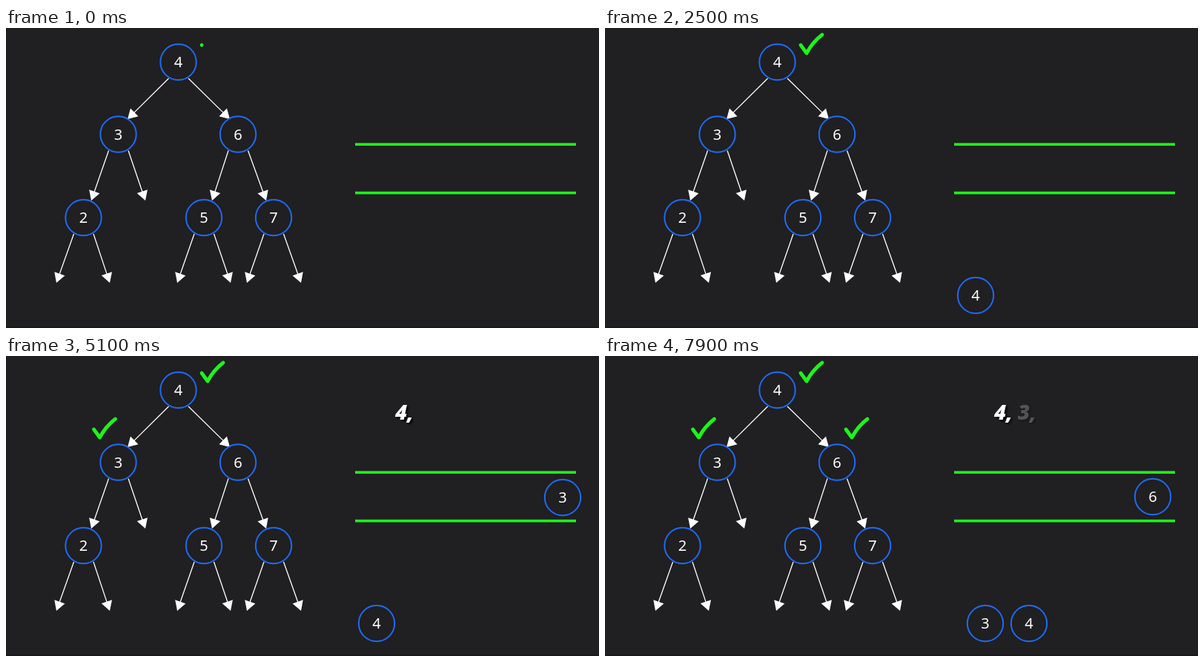
These frames come from a looping animation (800x405 px, 8000 ms). An HTML page with a canvas:

```html
<!DOCTYPE html>
<html>
<head>
<meta charset="utf-8">
<style>
html, body { margin: 0; height: 100%; overflow: hidden; background: #201f21; }
canvas { display: block; width: 800px; height: 405px; }
</style>
</head>
<body>
<canvas id="stage" width="800" height="405"></canvas>
<script>
const LOOP = 8000, BG = '#201f21', BLUE = [29, 107, 245], CYAN = [72, 184, 248], GREEN = '#1cf51c';
const ctx = document.getElementById('stage').getContext('2d');

// value, x, y, then the x of the left and right arrow tips
const tree = [
  [4, 232.5, 46, 164, 302],
  [3, 151.5, 143.5, 115, 188],
  [6, 313, 143.5, 278, 351],
  [2, 104.5, 256, 68, 140],
  [5, 267, 256, 231, 303],
  [7, 361, 256, 325, 398]
];

const clamp = v => Math.min(1, Math.max(0, v));
const span = (t, a, b) => clamp((t - a) / (b - a));
const mix = (a, b, k) => a + (b - a) * k;
const easeOut = u => 1 - (1 - u) ** 3;
const easeBoth = u => u < .5 ? 4 * u ** 3 : 1 - 4 * (1 - u) ** 3;

function track(d) {
  const path = document.createElementNS('http://www.w3.org/2000/svg', 'path');
  path.setAttribute('d', d);
  const length = path.getTotalLength();
  return k => path.getPointAtLength(k * length);
}
const exit4 = track('M741 191H450C400 191 400 361 500 361');
const exit3 = track('M669.5 189.5H450C400 190 400 361 513 361');

function node(value, x, y, glow = 0) {
  ctx.beginPath();
  ctx.arc(x, y, 24.2, 0, 7);
  ctx.fillStyle = BG;
  ctx.fill();
  ctx.strokeStyle = `rgb(${BLUE.map((c, i) => mix(c, CYAN[i], glow))})`;
  ctx.lineWidth = 2;
  ctx.stroke();
  ctx.fillStyle = '#fff';
  ctx.font = '500 20px "Noto Sans", "Open Sans", sans-serif';
  ctx.textAlign = 'center';
  ctx.fillText(value, x, y + 7);
}

function arrow(x1, y1, x2, y2) {
  const a = Math.atan2(y2 - y1, x2 - x1);
  ctx.strokeStyle = ctx.fillStyle = '#fff';
  ctx.lineWidth = 1.3;
  ctx.beginPath();
  ctx.moveTo(x1, y1);
  ctx.lineTo(x2 - 8 * Math.cos(a), y2 - 8 * Math.sin(a));
  ctx.stroke();
  ctx.save();
  ctx.translate(x2, y2);
  ctx.rotate(a);
  ctx.beginPath();
  ctx.moveTo(0, 0);
  ctx.lineTo(-13, -7.5);
  ctx.lineTo(-13, 7.5);
  ctx.fill();
  ctx.restore();
}

function check(x, y, k) {
  if (!k) return;
  const down = clamp(k / .3), up = clamp((k - .3) / .7);
  ctx.strokeStyle = GREEN;
  ctx.lineWidth = 4.8;
  ctx.lineCap = ctx.lineJoin = 'round';
  ctx.beginPath();
  ctx.moveTo(x, y);
  ctx.lineTo(x + 8 * down, y + 11 * down);
  if (up) ctx.quadraticCurveTo(x + 8 + 8 * up, y + 11 - 15 * up, x + 8 + 21 * up, y + 11 - 25 * up);
  ctx.stroke();
  ctx.lineCap = 'butt';
}

function label(text, x, alpha) {
  if (!alpha) return;
  ctx.save();
  ctx.globalAlpha = alpha;
  ctx.shadowColor = '#000';
  ctx.shadowBlur = 3;
  ctx.shadowOffsetX = ctx.shadowOffsetY = 2;
  ctx.fillStyle = '#fff';
  ctx.font = 'italic 800 28px "Open Sans", "Noto Sans", sans-serif';
  ctx.textAlign = 'left';
  ctx.fillText(text, x, 86);
  ctx.restore();
}

function draw(t) {
  ctx.fillStyle = BG;
  ctx.fillRect(0, 0, 800, 405);
  ctx.fillStyle = '#19181a';
  ctx.fillRect(0, 403, 800, 2);

  const glow = span(t, 3700, 4000) * (1 - span(t, 4500, 5000));
  for (const [value, x, y, left, right] of tree) {
    const tip = y < 100 ? 123 : y < 200 ? 233 : 344;
    arrow(x - 13, y + 22, left, tip);
    arrow(x + 13.5, y + 22, right, tip);
    node(value, x, y, value === 6 ? glow : 0);
  }

  check(264, 23, span(t, 0, 500));
  check(118.5, 99, span(t, 2850, 3350));
  check(325, 99, span(t, 5300, 5800));

  ctx.fillStyle = GREEN;
  ctx.fillRect(471, 155.3, 298, 3.6);
  ctx.fillRect(471, 220.8, 298, 3.6);

  // 4: enter the queue, leave on the left, then make room below
  if (t < 1000) node(4, mix(830, 741, easeOut(span(t, 0, 800))), 191);
  else {
    const p = exit4(easeBoth(span(t, 1000, 2450)));
    node(4, p.x + 72 * easeBoth(span(t, 6850, 7600)), p.y);
  }

  if (t > 2850) {
    const shift = easeBoth(span(t, 5400, 6150));
    const p = t < 6290
      ? { x: mix(mix(830, 751, easeOut(span(t, 2850, 3700))), 669.5, shift), y: mix(191, 189.5, shift) }
      : exit3(easeBoth(span(t, 6290, 7690)));
    node(3, p.x, p.y);
  }

  if (t > 5300) node(6, mix(830, 739, easeOut(span(t, 5300, 6150))), 190);

  label('4,', 525, span(t, 2800, 3400));
  label('3,', 557, span(t, 7700, 8500));
}

const start = performance.now();
function tick() {
  draw((performance.now() - start) % LOOP);
  requestAnimationFrame(tick);
}
tick();
</script>
</body>
</html>
```
